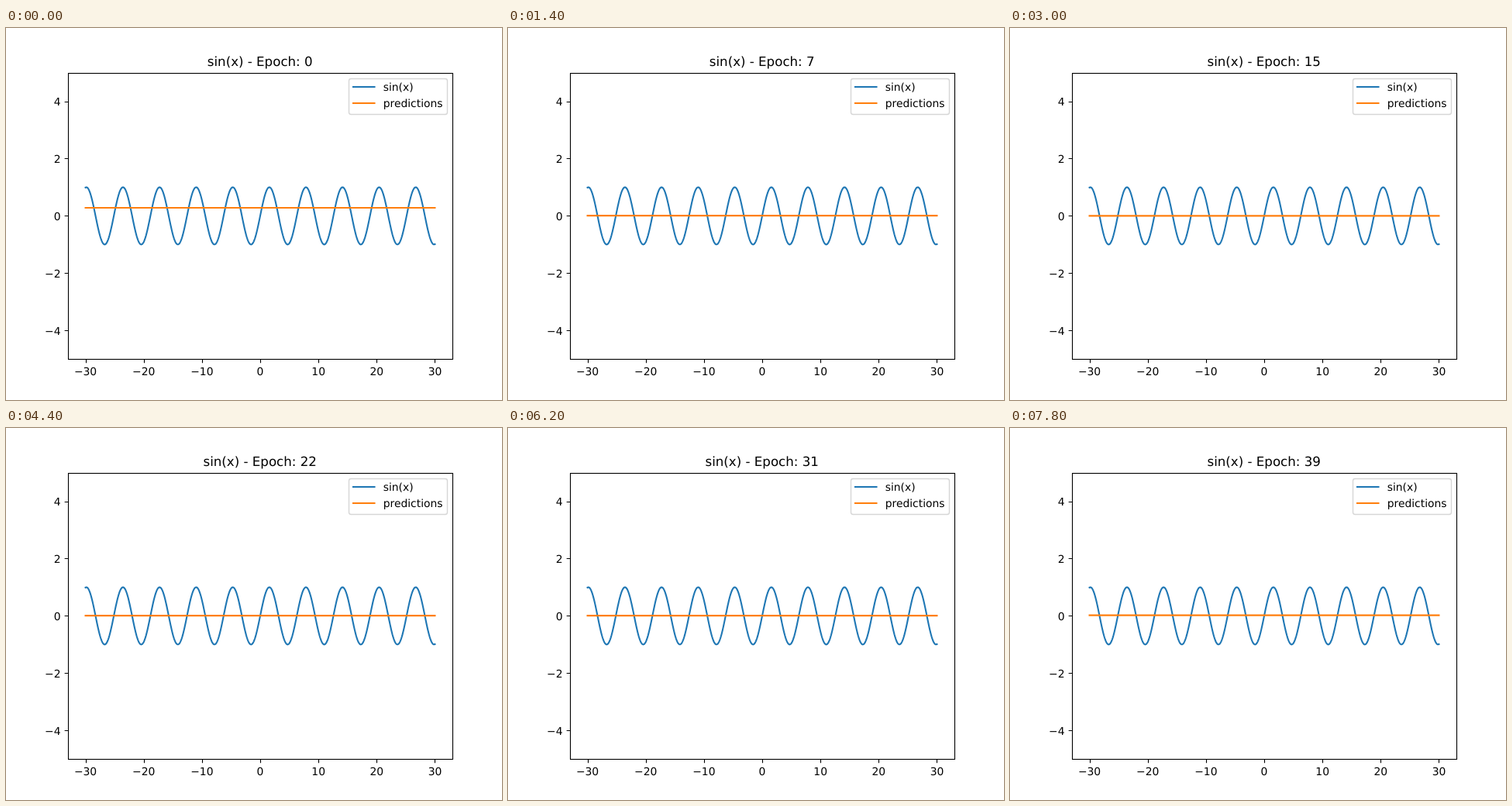
An HTML page that plays this animation: 640x480 px, repeating every 8000 ms.

```html
<!DOCTYPE html>
<html lang="en">
<head>
<meta charset="utf-8">
<title>sin(x) training</title>
<style>
  html, body { margin: 0; width: 100%; height: 100%; overflow: hidden; background: #fff; }
  svg { display: block; width: 640px; height: 480px; }
  text { font: 13.889px "DejaVu Sans", sans-serif; text-rendering: geometricPrecision; }
  #title { font-size: 16.667px; }
  .mid { text-anchor: middle; }
  .end { text-anchor: end; }
  .axis { fill: none; stroke: #000; stroke-width: 1.11; }
  .curve { fill: none; stroke-width: 2.083; stroke-linecap: square; stroke-linejoin: round; }
  .truth { stroke: #1f77b4; }
  .guess { stroke: #ff7f0e; }
  .box { fill: #fff; fill-opacity: .8; stroke: #ccc; stroke-opacity: .8; stroke-width: 1.389; }
</style>
</head>
<body>
<svg viewBox="0 0 640 480">
  <path id="sine" class="curve truth"/>
  <path id="prediction" class="curve guess"/>
  <path id="ticks" class="axis"/>
  <rect class="axis" x="80.5" y="58.5" width="496" height="369"/>
  <g id="labels"></g>
  <text id="title" class="mid" x="327.7" y="49"></text>
  <rect class="box" x="442.5" y="65.5" width="127" height="46" rx="2.78"/>
  <path class="curve truth" d="M448 76H475.5"/>
  <path class="curve guess" d="M448 97H475.5"/>
  <text x="486.7" y="81">sin(x)</text>
  <text x="486.7" y="102">predictions</text>
</svg>
<script>
  const EPOCH_MS = 200, EPOCHS = 40;
  const $ = id => document.getElementById(id);
  const toX = x => 328 + x * 496 / 66;
  const toY = y => 242.4 - y * 36.96;
  const snap = v => Math.floor(v + 0.5) + 0.5;

  // Slow drift of the prediction once the initial bias is gone: [epoch, value]
  const drift = [[0, 0], [4, 0.005], [11, 0.008], [15, 0], [22, 0.008], [31, 0.008], [39, 0.02]];

  function predict(epoch) {
    const i = Math.max(1, drift.findIndex(([e]) => e >= epoch));
    const [e0, v0] = drift[i - 1], [e1, v1] = drift[i];
    return 0.28 * 0.3 ** epoch + v0 + (v1 - v0) * (epoch - e0) / (e1 - e0);
  }

  function addLabel(value, x, y, anchor) {
    const label = document.createElementNS("http://www.w3.org/2000/svg", "text");
    label.setAttribute("x", x);
    label.setAttribute("y", y);
    label.setAttribute("class", anchor);
    label.textContent = String(value).replace("-", "\u2212");
    $("labels").append(label);
  }

  let ticks = "";
  for (let x = -30; x <= 30; x += 10) {
    ticks += `M${snap(toX(x))} 427.5v4.86`;
    addLabel(x, toX(x), 448, "mid");
  }
  for (let y = -4; y <= 4; y += 2) {
    ticks += `M80.5 ${snap(toY(y))}h-4.86`;
    addLabel(y, 70.5, Math.round(toY(y) + 5.28), "end");
  }
  $("ticks").setAttribute("d", ticks);

  const points = Array.from({ length: 601 }, (_, i) => {
    const x = -30 + i / 10;
    return `${toX(x).toFixed(2)} ${toY(Math.sin(x)).toFixed(2)}`;
  });
  $("sine").setAttribute("d", "M" + points.join("L"));

  let shown = -1;
  function draw(now) {
    const epoch = Math.floor(now / EPOCH_MS) % EPOCHS;
    if (epoch !== shown) {
      shown = epoch;
      $("title").textContent = `sin(x) - Epoch: ${epoch}`;
      $("prediction").setAttribute("d", `M${toX(-30)} ${toY(predict(epoch))}H${toX(30)}`);
    }
    requestAnimationFrame(draw);
  }
  draw(performance.now());
</script>
</body>
</html>
```
